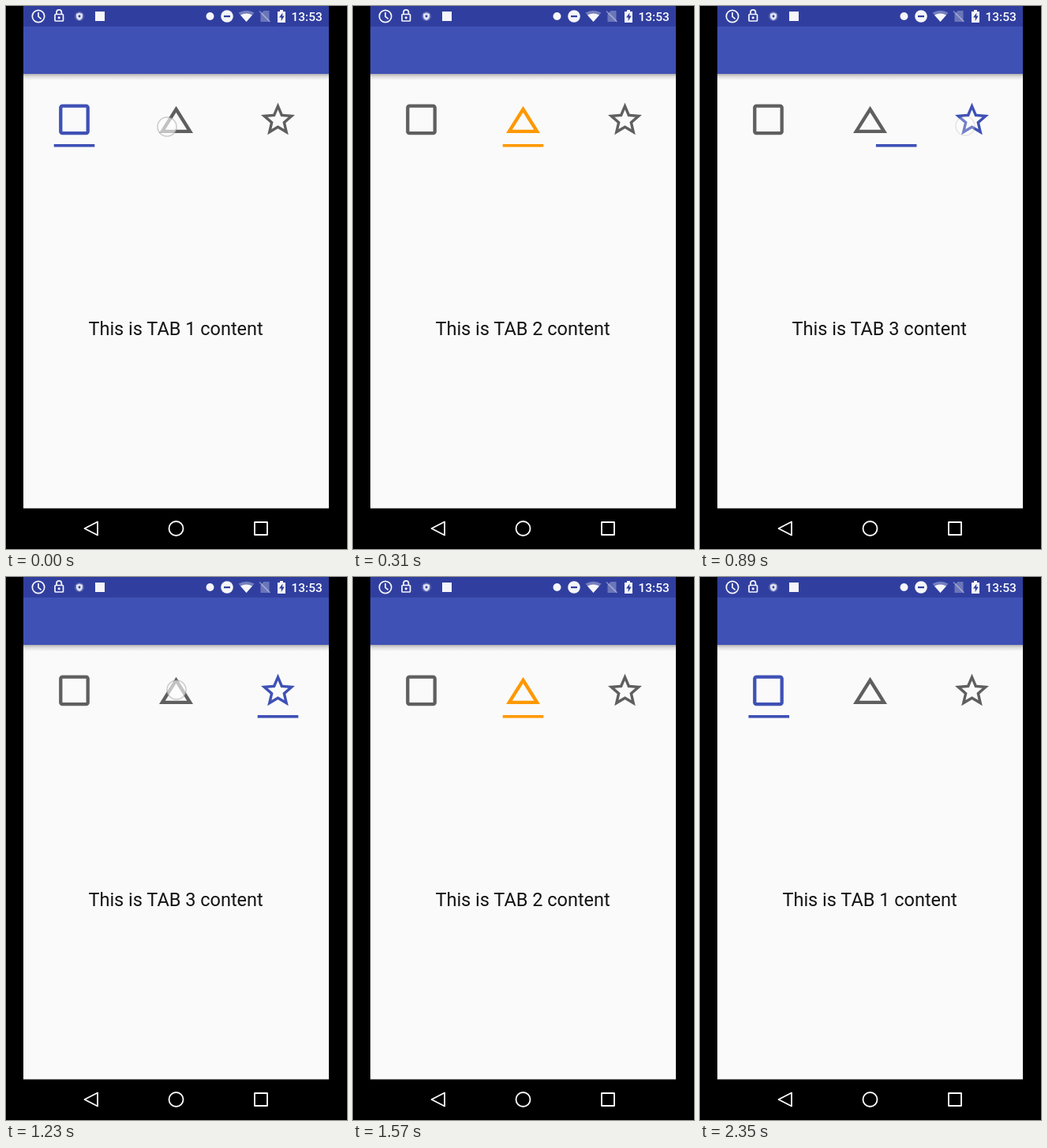
Recreate the animation shown at these times as an HTML page. Size 432x688 px, loop 2380 ms.

```html
<!DOCTYPE html>
<html lang="en">
<head>
<meta charset="utf-8">
<title>Tabs</title>
<style>
  html, body { margin: 0; width: 100%; height: 100%; overflow: hidden; background: #000; }
  svg { display: block; width: 432px; height: 688px; }
  text { font-family: Roboto, "Noto Sans", sans-serif; }
  .label { font-size: 23.5px; text-anchor: middle; fill: #141414; }
  .clock { font-size: 15.5px; font-weight: 500; fill: #fff; }
  .line { fill: none; stroke: #f6f6fa; stroke-width: 1.7; }
  .nav { fill: none; stroke: #fff; stroke-width: 1.8; stroke-linejoin: round; }
</style>
</head>
<body>
<svg viewBox="0 0 432 688">
  <defs>
    <clipPath id="page"><rect x="22" y="86" width="387" height="550"/></clipPath>
    <linearGradient id="shade" x2="0" y2="1">
      <stop offset="0" stop-opacity=".3"/>
      <stop offset=".4" stop-opacity=".12"/>
      <stop offset="1" stop-opacity="0"/>
    </linearGradient>
  </defs>

  <rect width="432" height="688"/>
  <rect x="22" y="86" width="387" height="550.5" fill="#fafafa"/>
  <rect x="22" y="26" width="387" height="60" fill="#3f51b5"/>
  <rect x="22" width="387" height="26" fill="#303f9f"/>
  <rect x="22" y="86" width="387" height="8" fill="url(#shade)"/>

  <!-- status bar -->
  <g fill="#f6f6fa">
    <g class="line">
      <circle cx="41" cy="13" r="7.7"/>
      <path d="M41 8v5.3l3.6 3"/>
      <rect x="62" y="10.5" width="10.5" height="8.5" rx="1"/>
      <path d="M64 10V8a3.2 3.2 0 0 1 6.4 0v2"/>
    </g>
    <circle cx="67.2" cy="14.8" r="1.6"/>
    <circle cx="93" cy="13" r="6" opacity=".22"/>
    <path d="M93 8.5l4 1.5v3q0 3.5-4 5q-4-1.5-4-5v-3z" opacity=".85"/>
    <circle cx="93" cy="13" r="1.4" fill="#303f9f"/>
    <rect x="113" y="7" width="12" height="12"/>
    <circle cx="258.5" cy="13" r="5"/>
    <circle cx="280" cy="13" r="7.8"/>
    <rect x="276" y="12" width="8" height="2.2" fill="#303f9f"/>
    <path d="M304.5 20L294.5 8.5Q304.5 3 314.5 8.5z" opacity=".35"/>
    <path d="M304.5 20L297 11.4Q304.5 7.5 312 11.4z"/>
    <path d="M326.5 6h7v14h-11V10z" opacity=".3"/>
    <path class="line" d="M321 6.5l13.5 13.5" opacity=".4"/>
    <path d="M344 7h3V5h4v2h3v14h-10z"/>
    <path d="M350.5 8.5l-4.5 6h2.7v4.5l4-6.5h-2.6z" fill="#303f9f"/>
  </g>
  <text class="clock" x="361.5" y="18.5">13:53</text>

  <!-- tab icons, drawn on a 24-unit grid -->
  <g id="icons" fill="none" stroke-width="2">
    <rect x="4" y="4" width="16" height="16" rx="1"/>
    <path d="M12 5.89L20.2 19H3.8z"/>
    <path stroke-width="0" fill-rule="evenodd" d="M22 9.24l-7.19-.62L12 2 9.19 8.63 2 9.24l5.46 4.73L5.82 21 12 17.27 18.18 21l-1.63-7.03zM12 15.4l-3.76 2.27 1-4.28-3.32-2.88 4.38-.38L12 6.1l1.71 4.04 4.38.38-3.32 2.88 1 4.28z"/>
  </g>
  <rect id="bar" y="175" width="51.6" height="3.6"/>

  <g clip-path="url(#page)">
    <g id="pages">
      <text class="label" x="215.1" y="417">This is TAB 1 content</text>
      <text class="label" x="602.1" y="417">This is TAB 2 content</text>
      <text class="label" x="989.1" y="417">This is TAB 3 content</text>
    </g>
  </g>

  <circle id="touch" r="12" fill="#fff" fill-opacity=".62" stroke="#a0a0a0" stroke-opacity=".55" stroke-width="1.5"/>

  <g class="nav">
    <path d="M99.5 662L116 653.5v17z"/>
    <circle cx="215.5" cy="662" r="9"/>
    <rect x="315" y="654" width="16" height="16"/>
  </g>
</svg>
<script>
const LOOP = 2380, TICK = 34, PAGE = 387, GAP = 129;
const GREY = '#5f5f5f', COLORS = ['#3f51b5', '#ff9800', '#3f51b5'];

// start: finger down; hold: time until it lifts
const TAPS = [
  { start: 0, hold: 74, from: 0, to: 1, x: 204, y: 153 },
  { start: 680, hold: 104, from: 1, to: 2, x: 336, y: 152 },
  { start: 1230, hold: 104, from: 2, to: 1, x: 216, y: 143 },
  { start: 1980, hold: 126.3, from: 1, to: 0, x: 84, y: 143 }
];

const byId = id => document.getElementById(id);
const icons = [...byId('icons').children];
const bar = byId('bar'), pages = byId('pages'), touch = byId('touch');

const clamp = v => Math.min(1, Math.max(0, v));
const mix = (a, b, k) => a + (b - a) * k;
const quintOut = u => 1 - (1 - u) ** 5;
const bezier = (s, a, b) => 3 * (1 - s) ** 2 * s * a + 3 * (1 - s) * s * s * b + s ** 3;

// cubic-bezier(.4, 0, .2, 1)
function fastOutSlowIn(u) {
  let lo = 0, hi = 1;
  for (let i = 0; i < 20; i++) {
    const mid = (lo + hi) / 2;
    if (bezier(mid, .4, .2) < u) lo = mid; else hi = mid;
  }
  return bezier(hi, 0, 1);
}

icons.forEach((icon, i) =>
  icon.setAttribute('transform', `translate(${60.7 + i * GAP} 118.1) scale(2.15)`));

function draw(time) {
  const tap = TAPS.findLast(p => p.start <= time);
  const age = Math.floor((time - tap.start) / TICK) * TICK;
  const since = age - tap.hold;
  const scroll = mix(tap.from, tap.to, quintOut(clamp(since / 200)));
  const slide = mix(tap.from, tap.to, fastOutSlowIn(clamp((since - 54) / 178)));
  const active = since >= 0 ? tap.to : tap.from;

  pages.setAttribute('transform', `translate(${-PAGE * scroll} 0)`);
  bar.setAttribute('x', 60.7 + GAP * slide);
  bar.setAttribute('fill', COLORS[active]);
  icons.forEach((icon, i) => {
    const color = i === active ? COLORS[i] : GREY;
    icon.setAttribute('stroke', color);
    if (i === 2) icon.setAttribute('fill', color);
  });
  touch.setAttribute('cx', tap.x);
  touch.setAttribute('cy', tap.y);
  touch.setAttribute('opacity', 1 - clamp(since / 180));
}

const begin = performance.now();
function frame() {
  draw((performance.now() - begin) % LOOP);
  requestAnimationFrame(frame);
}
frame();
</script>
</body>
</html>
```
